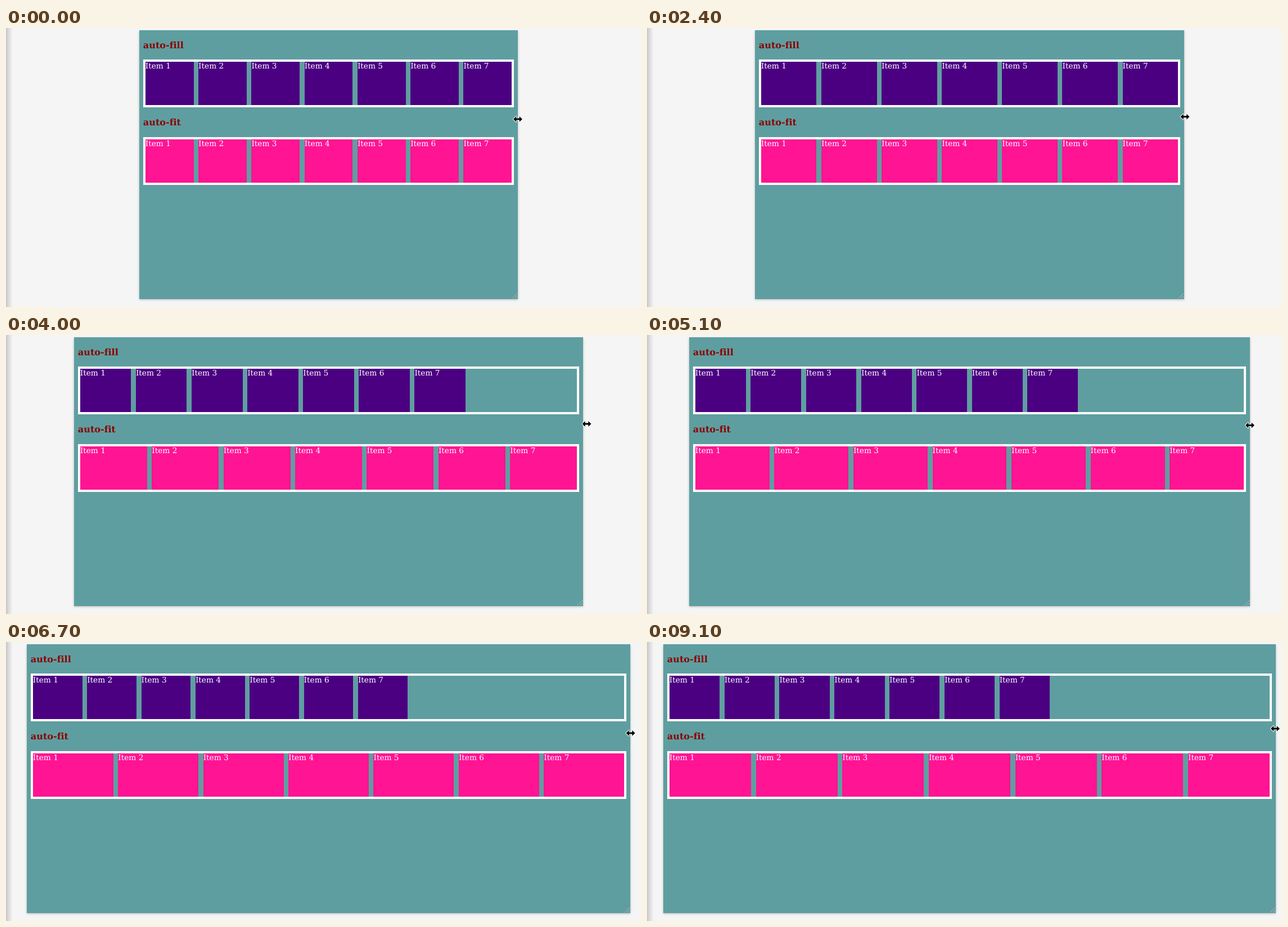
An HTML page for the animation above (9.8 s loop, 1129x496 px).

```html
<!DOCTYPE html>
<html lang="en">
<head>
<meta charset="utf-8">
<title>auto-fill and auto-fit</title>
<style>
html, body { margin: 0; width: 100%; height: 100%; overflow: hidden; background: #f5f5f5; }
svg { display: block; width: 1129px; height: 496px; }
text {
  font-family: "DejaVu Serif", serif; font-size: 13.71px; fill: #fff;
  font-variant-ligatures: none; text-rendering: geometricPrecision;
}
.title { font-size: 16.05px; font-weight: bold; fill: #8b0000; }
</style>
</head>
<body>
<svg id="stage" viewBox="0 0 1129 496">
  <defs>
    <linearGradient id="edge">
      <stop offset="0" stop-color="#c6c6c6"/>
      <stop offset=".45" stop-color="#dedede"/>
      <stop offset="1" stop-color="#f5f5f5"/>
    </linearGradient>
    <filter id="blur" x="-5%" y="-5%" width="110%" height="110%">
      <feGaussianBlur stdDeviation="2"/>
    </filter>
  </defs>
  <rect width="1129" height="496" fill="#f5f5f5"/>
  <rect width="12" height="496" fill="url(#edge)"/>
</svg>
<script>
const LOOP = 9800, STEP = 100, STAGE = 1147, SCALE = 6 / 7;
const PAD = 8 * SCALE, BORDER = 4, GAP = 10 * SCALE, MIN = 100 * SCALE;
const COUNT = 7, TOP = 4, BOTTOM = 482, ITEM = 77;

// Drag path: time, left side of the panel
const DRAG = [
  [900, 237], [1700, 212], [2400, 192], [2600, 192], [3100, 151], [3300, 141],
  [4000, 121], [5100, 75], [6200, 46], [6700, 37], [7300, 37], [8000, 29]
];
// Pointer path: time, distance from the right side, height
const HAND = [
  [900, 0, 162], [1700, 2.5, 161], [3100, .5, 154.5], [4000, 6.5, 158], [5100, 0, 160.5],
  [6700, .5, 162], [8700, 0, 163], [8900, 0, 170], [9000, 0, 170], [9100, -1, 154]
];

const stage = document.getElementById("stage");

function set(el, attrs) {
  for (const key in attrs) el.setAttribute(key, attrs[key]);
}

function add(tag, attrs, label) {
  const el = document.createElementNS("http://www.w3.org/2000/svg", tag);
  set(el, attrs);
  if (label) el.textContent = label;
  return stage.appendChild(el);
}

function along(path, t) {
  const next = path.findIndex(key => key[0] > t);
  if (next === 0) return path[0].slice(1);
  if (next < 0) return path[path.length - 1].slice(1);
  const [from, ...a] = path[next - 1], [to, ...b] = path[next];
  const p = (t - from) / (to - from);
  return a.map((v, i) => v + (b[i] - v) * p);
}

// Box edges land on whole pixels
function span(el, from, to) {
  const x = Math.round(from);
  set(el, { x, width: Math.round(to) - x });
}

const shadow = add("rect", { y: TOP + 2, height: BOTTOM - TOP - 1, fill: "#000", opacity: .24, filter: "url(#blur)" });
const panel = add("rect", { y: TOP, height: BOTTOM - TOP, fill: "#5f9ea0" });

function makeGrid(name, top, color) {
  const y = Math.round(top), inner = y + BORDER;
  return {
    title: add("text", { class: "title", y: Math.round(top - 20.6) }, name),
    frame: add("rect", { y, height: ITEM + 2 * BORDER, fill: "#fff" }),
    hole: add("rect", { y: inner, height: ITEM, fill: "#5f9ea0" }),
    items: Array.from({ length: COUNT }, (_, i) => ({
      box: add("rect", { y: inner, height: ITEM, fill: color }),
      label: add("text", { y: Math.round(top + 16.2) }, "Item " + (i + 1))
    }))
  };
}

const fill = makeGrid("auto-fill", 56.2, "#4b0082");
const fit = makeGrid("auto-fit", 193.6, "#ff1493");

const grip = add("g", {});
for (const size of [11, 6]) {
  for (const [inset, stroke] of [[0, "#5a7c7e"], [1, "#b9cccd"]]) {
    const d = `M${inset - size} 0L0 ${inset - size}`;
    grip.appendChild(add("path", { d, stroke }));
  }
}

const pointer = add("path", {
  d: "M-8 0L-2.8-5V-1.4H2.8V-5L8 0L2.8 5V1.4H-2.8V5Z",
  stroke: "#fff", "stroke-width": 1.8, "paint-order": "stroke", "stroke-linejoin": "round"
});

function layout(grid, left, right, columns) {
  const start = left + BORDER, end = right - BORDER;
  const pitch = (end - start + GAP) / columns;
  set(grid.title, { x: left });
  span(grid.frame, left, right);
  span(grid.hole, Math.round(left) + BORDER, Math.round(right) - BORDER);
  grid.items.forEach(({ box, label }, i) => {
    const x = start + i * pitch;
    span(box, x, x + pitch - GAP);
    set(label, { x });
  });
}

function render(time) {
  const t = Math.floor(time / STEP) * STEP;
  const [left] = along(DRAG, t), [lead, y] = along(HAND, t);
  const right = STAGE - left;
  const room = right - left - 2 * (PAD + BORDER) + GAP;
  const columns = Math.max(COUNT, Math.floor(room / (MIN + GAP)));
  span(shadow, left, right);
  span(panel, left, right);
  layout(fill, left + PAD, right - PAD, columns);
  layout(fit, left + PAD, right - PAD, COUNT);
  set(grip, { transform: `translate(${Math.round(right) - .5} ${BOTTOM - 1})` });
  set(pointer, { transform: `translate(${right + lead} ${y})` });
}

function tick() {
  render(performance.now() % LOOP);
  requestAnimationFrame(tick);
}
tick();
</script>
</body>
</html>
```
